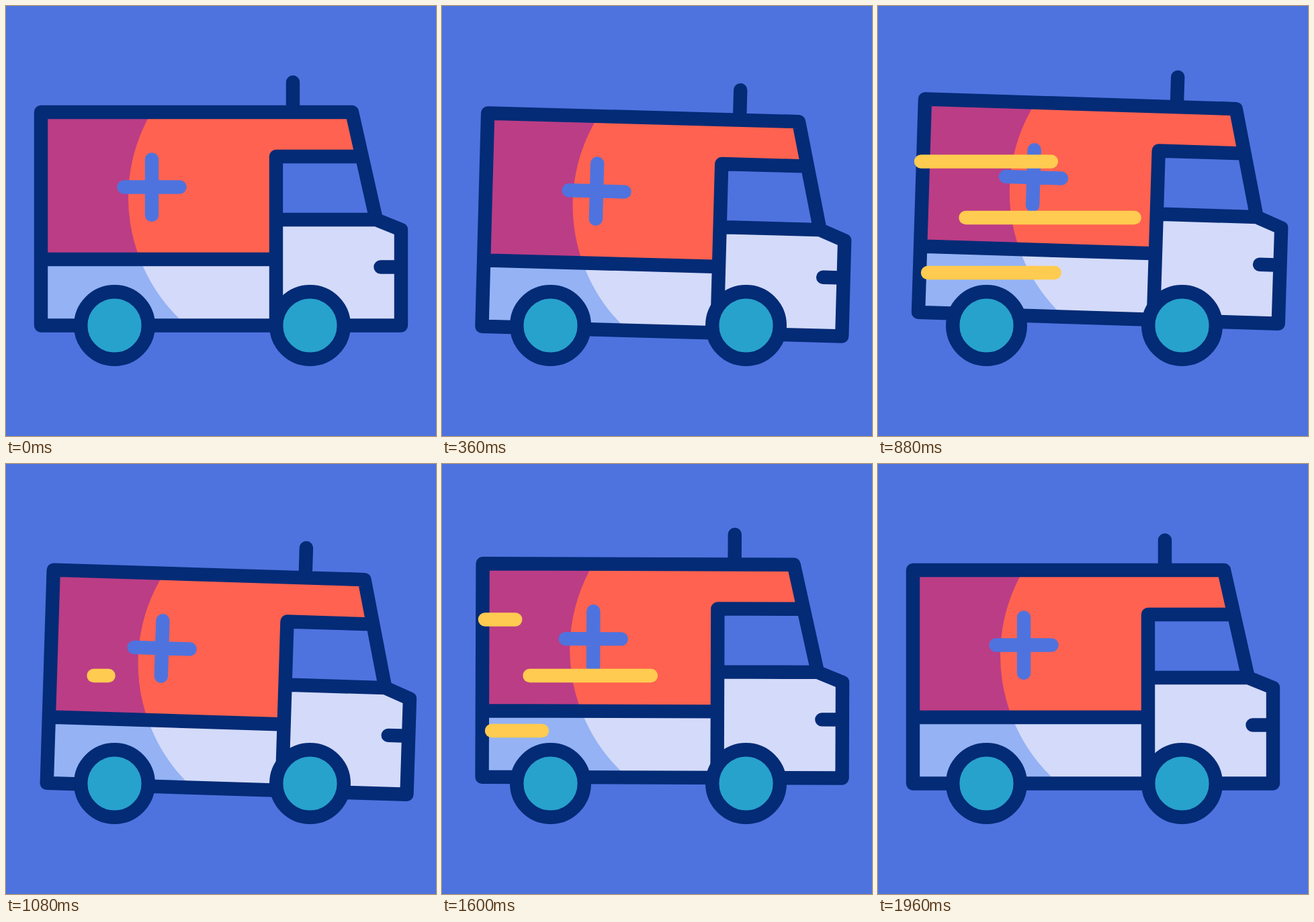
An HTML page that plays this animation: 640x640 px, repeating every 2000 ms.

```html
<!DOCTYPE html>
<html lang="en">
<head>
<meta charset="utf-8">
<title>Ambulance</title>
<style>
  html, body { margin: 0; width: 100%; height: 100%; overflow: hidden; background: #4e73df; }
  svg { display: block; width: 100%; height: 100%; }
  .line { fill: none; stroke: #032b76; stroke-width: 20.4; stroke-linecap: round; stroke-linejoin: round; }
  .wheel { fill: #27a2cd; stroke: #032b76; stroke-width: 20.4; }
  .wind { stroke: #ffcb50; stroke-width: 20.4; stroke-linecap: round; }
</style>
</head>
<body>
<svg viewBox="0 0 640 640">
  <g id="body">
    <path fill="#bb3d85" d="M52 158H250V377H52Z"/>
    <path fill="#94b2f4" d="M52 377H290V475.500H52Z"/>
    <path fill="#ff6250" d="M216.500 158H515L530 224H402V377H199.500A251 251 0 0 1 216.500 158Z"/>
    <path fill="#d4daf9" d="M199.500 377H402V318H551L588 333V475.500H269A251 251 0 0 1 199.500 377Z"/>
    <path class="line" style="stroke:#4e73df" d="M217 228.500V311M175.500 269.500H258.500"/>
    <path class="line" d="M52 158H515L551 318L588 333V475.500H52ZM52 377H402M402 475V224H525M402 318H551M557.500 388.500H588M427 113.500V158"/>
  </g>
  <circle class="wheel" cx="161.500" cy="475.500" r="50.300"/>
  <circle class="wheel" cx="452.500" cy="475.500" r="50.300"/>
  <g id="winds"></g>
</svg>
<script>
const LOOP = 2000, STEP = 40;
const body = document.getElementById('body');
const windGroup = document.getElementById('winds');

// Keyframes: [time in ms, value]
const shiftX = [[0, 0], [520, 15], [620, 15.6], [950, 12.4], [1280, 15.6], [1452, 14], [1782, 0]];
const shiftY = [[0, 0], [400, 9], [462, 9], [792, -15.4], [1122, 9], [1452, -15.4], [1782, 0]];
const tilt = [[0, 0], [462, 1.8], [1452, 1.8], [1782, -2], [1960, 0]];

// Each streak grows leftwards, then shrinks towards its left end; it runs twice per loop.
const WIND_PERIOD = 640, WIND_TIME = 258, TAIL_DELAY = 262;
const winds = [
  { y: 231.5, from: 415, to: 64, start: 498 },
  { y: 397, from: 327, to: 74, start: 533 },
  { y: 315, from: 383, to: 130.5, start: 607 }
];
for (const w of winds) {
  w.el = document.createElementNS('http://www.w3.org/2000/svg', 'line');
  w.el.setAttribute('class', 'wind');
  w.el.setAttribute('y1', w.y);
  w.el.setAttribute('y2', w.y);
  windGroup.append(w.el);
}

function ease(u) {
  u = Math.min(1, Math.max(0, u));
  return u * u * (3 - 2 * u);
}

function valueAt(keys, t) {
  const next = keys.findIndex(k => k[0] > t);
  if (next < 0) return keys[keys.length - 1][1];
  const [t0, a] = keys[next - 1], [t1, b] = keys[next];
  return a + (b - a) * ease((t - t0) / (t1 - t0));
}

function drawWind(w, t) {
  const since = t - w.start;
  const phase = since % WIND_PERIOD;
  const head = ease(phase / WIND_TIME);
  const tail = ease((phase - TAIL_DELAY) / WIND_TIME);
  const on = since > 0 && since < 2 * WIND_PERIOD && head > tail;
  w.el.style.display = on ? '' : 'none';
  w.el.setAttribute('x1', w.from + (w.to - w.from) * head);
  w.el.setAttribute('x2', w.from + (w.to - w.from) * tail);
}

function draw() {
  const t = Math.floor((performance.now() + 4) / STEP) * STEP % LOOP;
  body.setAttribute('transform',
    `translate(${valueAt(shiftX, t)} ${valueAt(shiftY, t)}) rotate(${valueAt(tilt, t)} 320 320)`);
  for (const w of winds) drawWind(w, t);
  requestAnimationFrame(draw);
}
draw();
</script>
</body>
</html>
```
